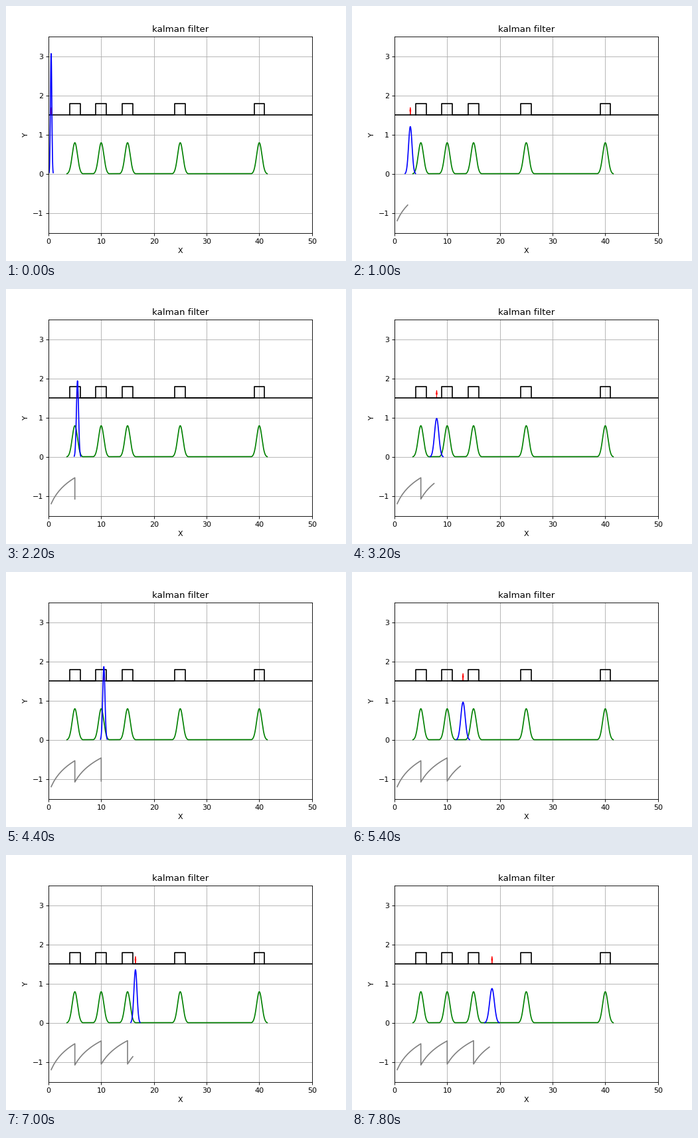
These frames come from a looping animation (512 px wide and 384 px high, 8000 ms). A matplotlib script:

```python
import numpy as np
import matplotlib.pyplot as plt
from matplotlib.animation import FuncAnimation

LANDMARKS = [5, 10, 15, 25, 40]
DX, GROWTH, SENSOR_VAR = 0.5, 0.04, 0.25
FRAMES = 40


def gauss(mu, sigma):
    """Bell curve sampled over three sigmas on each side."""
    x = np.linspace(mu - 3 * sigma, mu + 3 * sigma, 100)
    y = np.exp(-0.5 * ((x - mu) / sigma) ** 2) / (sigma * np.sqrt(2 * np.pi))
    return x, y


def run_filter(steps):
    """Predict at every step; spend one extra step correcting at a landmark."""
    x, p = 0.5, 0.13
    states = [(x, p)]
    corrected = False
    while len(states) < steps:
        if x in LANDMARKS and not corrected:
            p = p * SENSOR_VAR / (p + SENSOR_VAR)
            corrected = True
        else:
            x, p = x + DX, p + GROWTH
            corrected = False
        states.append((x, p))
    return np.array(states)


states = run_filter(FRAMES)
entropy = 0.5 * np.log(states[:, 1]) - 0.17

fig, ax = plt.subplots(figsize=(6.4, 4.8), dpi=80)
ax.set_title("kalman filter")
ax.set_xlabel("X")
ax.set_ylabel("Y")
ax.grid(True)

# corridor with a door at each landmark
ax.plot([0, 50], [1.5, 1.5], "k")
door_x = [m + d for m in LANDMARKS for d in (-1, -1, 1, 1)]
door_y = [1.5, 1.8, 1.8, 1.5] * len(LANDMARKS)
ax.plot(door_x, door_y, "k")

bells = [gauss(m, np.sqrt(SENSOR_VAR)) for m in LANDMARKS]
ax.plot(*np.hstack(bells), "g")

trace, = ax.plot([], [], color="gray")
belief, = ax.plot([], [], "b")
robot = ax.arrow(0.5, 1.5, 0, 0.1, head_width=0.2, head_length=0.1, color="r")

ax.set_xlim(0, 50)
ax.set_ylim(-1.5, 3.5)


def update(i):
    x, p = states[i]
    belief.set_data(*gauss(x, p))
    trace.set_data(states[:i, 0], entropy[:i])
    robot.set_data(x=x)
    return belief, trace, robot


anim = FuncAnimation(fig, update, frames=FRAMES, interval=200,
                     repeat=True, repeat_delay=0)
plt.show()
```
